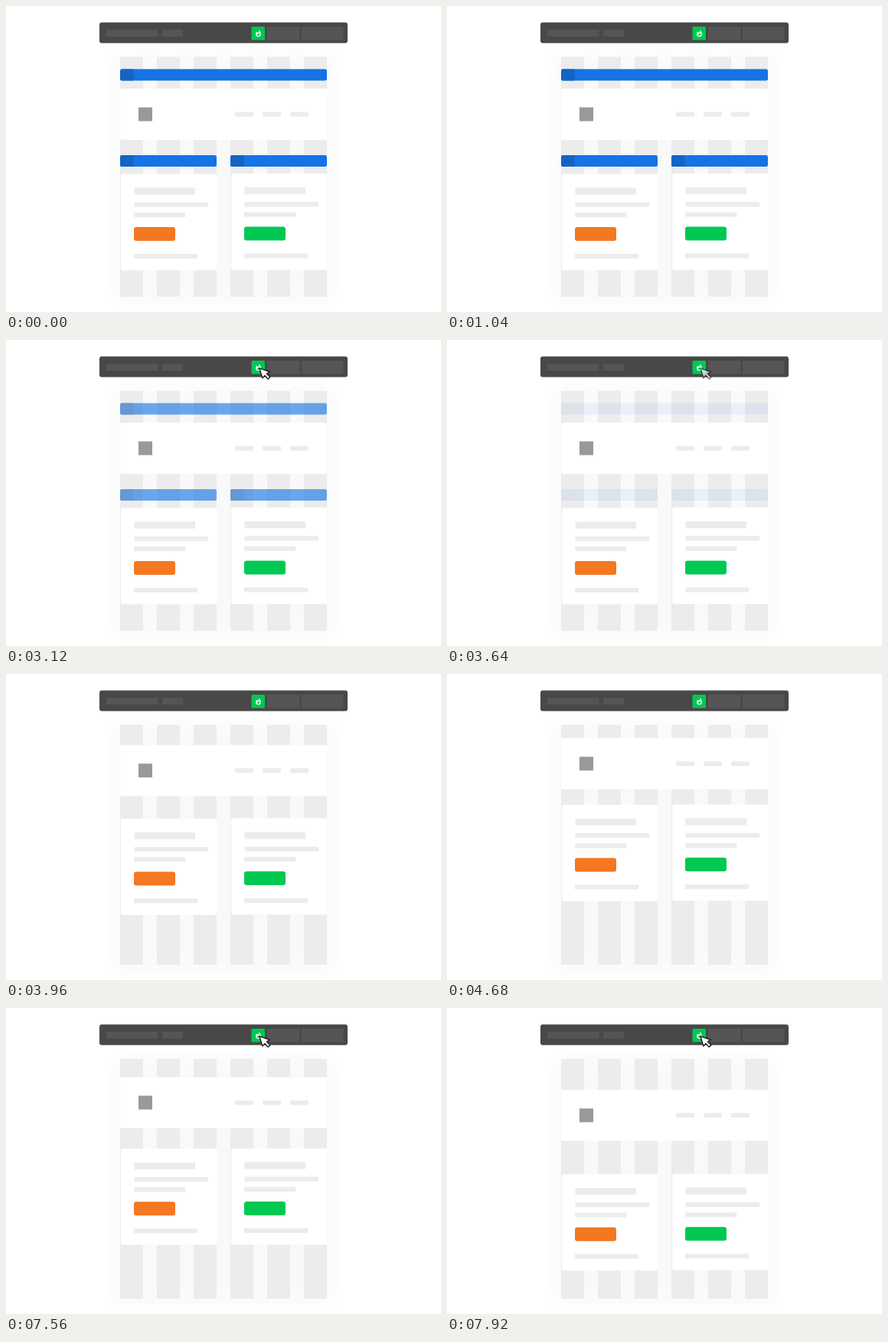
Write an HTML page that moves like this. It is 568 px wide and 400 px high and loops after 7960 ms.

```html
<!DOCTYPE html>
<html lang="en">
<head>
<meta charset="utf-8">
<title>Layout toggle</title>
<style>
  html, body { margin: 0; width: 100%; height: 100%; overflow: hidden; background: #fff; }
  svg { display: block; width: 568px; height: 400px; }
</style>
</head>
<body>
<svg viewBox="0 0 568 400">
  <defs>
    <filter id="glow" x="-20%" y="-20%" width="140%" height="140%"><feGaussianBlur stdDeviation="10"/></filter>
    <filter id="lift" x="-5%" y="-5%" width="110%" height="110%">
      <feDropShadow dx="0" dy="0" stdDeviation=".7" flood-opacity=".07"/>
    </filter>
    <g id="card">
      <rect width="125.5" height="126" rx="3" fill="#fff" filter="url(#lift)"/>
      <g fill="#ececec">
        <rect x="17.5" y="18" width="79.5" height="9"/>
        <rect x="17.5" y="37.2" width="96.5" height="6"/>
        <rect x="17.2" y="50.5" width="67" height="6"/>
        <rect x="17" y="104.5" width="83" height="6"/>
      </g>
      <rect x="17" y="69.5" width="54" height="18" rx="3" fill="currentColor"/>
    </g>
  </defs>

  <rect x="139" y="62" width="290" height="328" rx="16" fill="#000" opacity=".018" filter="url(#glow)"/>
  <g id="columns" fill="#ececec"></g>

  <rect x="122" y="21.5" width="324" height="27" rx="3" fill="#484848"/>
  <g fill="#555">
    <rect x="131" y="31" width="67.5" height="9" rx="1"/>
    <rect x="204" y="31" width="27" height="9" rx="1"/>
    <rect x="341" y="27" width="42.5" height="17.5" rx="1"/>
    <rect x="386" y="27" width="54.5" height="17.5" rx="1"/>
  </g>
  <rect x="320.5" y="27" width="17.5" height="17.5" rx="1.5" fill="#00c853"/>
  <path fill="#fff" transform="translate(324.4 31) scale(.42)" d="M13.5.67s.74 2.65.74 4.8c0 2.06-1.35 3.73-3.41 3.73-2.07 0-3.63-1.67-3.63-3.73l.03-.36C5.21 7.51 4 10.62 4 14c0 4.42 3.58 8 8 8s8-3.58 8-8C20 8.61 17.41 3.8 13.5.67zM11.71 19c-1.78 0-3.22-1.4-3.22-3.14 0-1.62 1.05-2.76 2.81-3.12 1.77-.36 3.6-1.21 4.62-2.58.39 1.29.59 2.65.59 4.04 0 2.65-2.15 4.8-4.8 4.8z"/>

  <g id="header">
    <rect x="149" width="270.5" height="67" rx="3" fill="#fff" filter="url(#lift)"/>
    <rect x="173" y="24.5" width="18" height="18" fill="#999"/>
    <g fill="#ececec">
      <rect x="299" y="30.5" width="24" height="6" rx="1.5"/>
      <rect x="335" y="30.5" width="24" height="6" rx="1.5"/>
      <rect x="371" y="30.5" width="24" height="6" rx="1.5"/>
    </g>
  </g>
  <g id="cards">
    <use href="#card" x="150" color="#f47721"/>
    <use href="#card" x="294" y="-.4" color="#00c853"/>
  </g>
  <g id="bars"></g>

  <path id="cursor" fill="#fff" stroke="#1c1c1c" stroke-width="1.4" stroke-linejoin="round"
    d="M.5.5 4.6 13.6 7.5 10.2 12 14.7 14.6 12.1 10.1 7.7 14 5.2Z"/>
</svg>
<script>
const LOOP = 7960;
const el = id => document.getElementById(id);
const clamp = v => Math.min(1, Math.max(0, v));
const ramp = (t, start, length) => clamp((t - start) / length);

// cubic-bezier(.3, 0, .1, 1)
function ease(x) {
  let lo = 0, hi = 1;
  for (let i = 0; i < 24; i++) {
    const s = (lo + hi) / 2, r = 1 - s;
    if (.9 * s * r * r + .3 * s * s * r + s ** 3 < x) lo = s; else hi = s;
  }
  return lo * lo * (3 - 2 * lo);
}

const rect = (x, y, w, h, extra = '') =>
  `<rect x="${x}" y="${y}" width="${w}" height="${h}" ${extra}/>`;

el('columns').innerHTML = [0, 1, 2, 3, 4, 5]
  .map(i => rect(149 + 48 * i, 66.5, 30, 313.5)).join('');

const bar = (x, y, w) => rect(x, y, w, 15, 'rx="2.5" fill="#1473e6"') +
  `<path fill="#1364c4" d="M${x + 17.5} ${y}h-15q-2.5 0-2.5 2.5v10q0 2.5 2.5 2.5h15z"/>`;
el('bars').innerHTML = bar(149, 82.5, 270) + bar(149, 195, 126) + bar(293, 195, 126);

function draw(t) {
  const open = 1 - ease(ramp(t, 3720, 720)) + ease(ramp(t, 7421, 720));
  el('header').setAttribute('transform', `translate(0 ${83.7 + 24.3 * open})`);
  el('cards').setAttribute('transform', `translate(0 ${171 + 48.5 * open})`);
  el('bars').setAttribute('opacity', 1 - ramp(t, 2760, 940));

  const second = t > 5000;
  const start = second ? 6080 : 1044;
  const left = 1 - ease(ramp(t, start, 1160));
  const fadeOut = second ? 0 : ramp(t, 3560, 240);
  el('cursor').setAttribute('transform', `translate(${330.3 + 100 * left} ${36.3 + 51 * left})`);
  el('cursor').setAttribute('opacity', ramp(t, start, 160) * (1 - fadeOut));
}

const began = performance.now();
function tick() {
  draw((performance.now() - began) % LOOP);
  requestAnimationFrame(tick);
}
tick();
</script>
</body>
</html>
```
